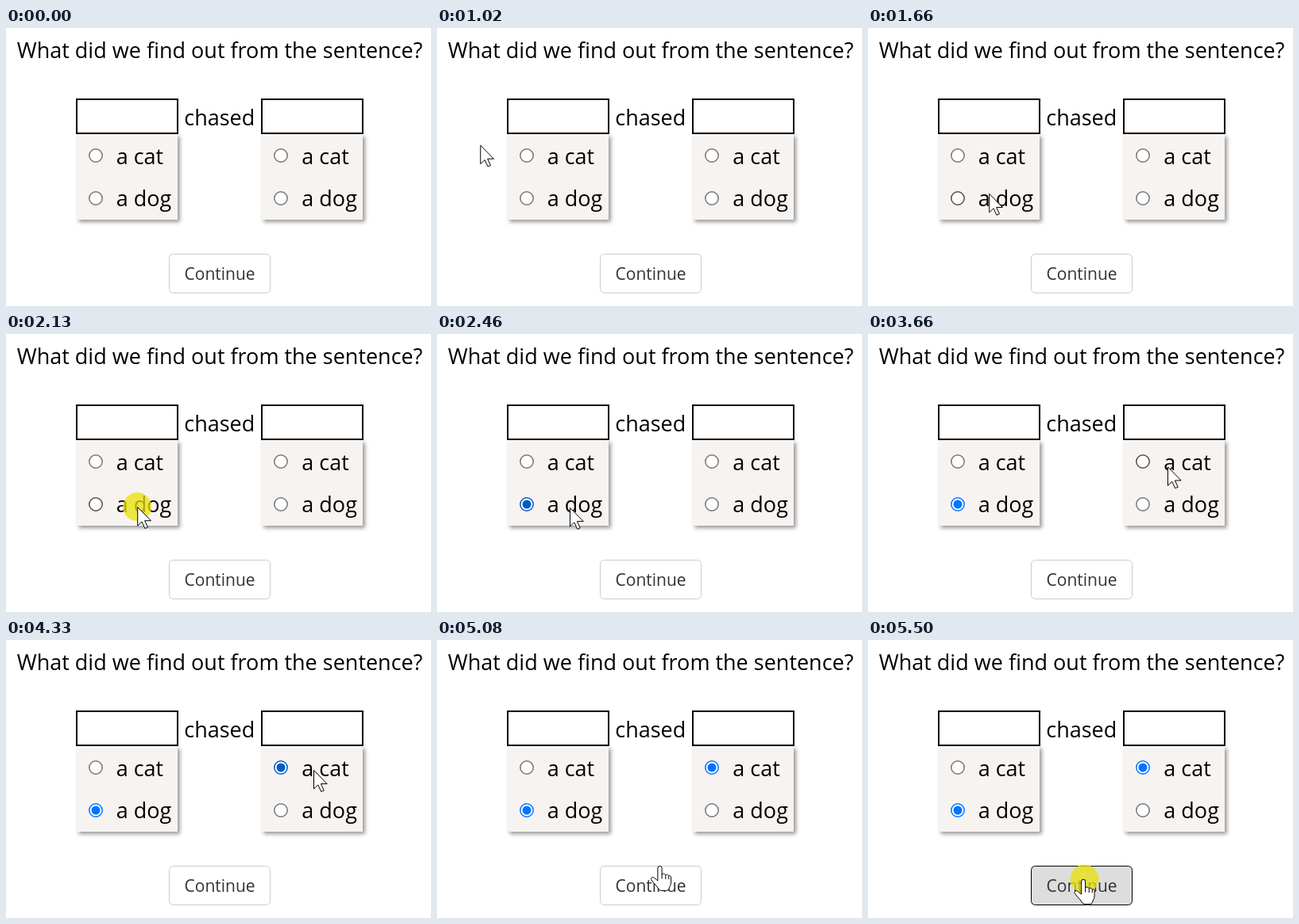
These frames come from a looping animation (535 px wide and 351 px high, 5570 ms). An HTML page:

```html
<!DOCTYPE html>
<html lang="en">
<head>
<meta charset="utf-8">
<style>
  html, body { margin: 0; width: 100%; height: 100%; overflow: hidden; background: #fff; }
  svg { display: block; font: 27px "Open Sans", sans-serif; }
  .panel { fill: #f7f3f1; filter: drop-shadow(3px 3px 2.5px #0006); }
  .box { fill: #fff; stroke: #000; stroke-width: 2; }
  .cursor { fill: #fff; stroke: #000; stroke-linejoin: round; }
</style>
</head>
<body>
<svg width="535" height="351" viewBox="0 0 535 351">
  <text x="13.7" y="38">What did we find out from the sentence?</text>
  <text x="224.3" y="123">chased</text>
  <g id="lists"></g>
  <rect id="button" x="205.5" y="285.5" width="127" height="49" rx="5"/>
  <text x="224.5" y="318" font-size="21" fill="#333">Continue</text>
  <g id="pointer">
    <circle id="glow" r="18" fill="#ebe10a" fill-opacity=".75"/>
    <path id="arrow" class="cursor" d="M.5.5V24L5.8 18.9 9.7 27.4 13.2 25.9 9.4 17.6H17.2Z"/>
    <path id="hand" class="cursor" transform="translate(-1.5 .5)" d="M-2.6 19V3a2.6 2.6 0 0 1 5.2 0V11.5c.5-2 4.2-2 4.7.7c.7-1.7 3.6-1.3 4 1c.9-1.2 2.8-.4 2.8 1.6V21c0 4-2 5-2.6 8Q11 31.5 8 31.5H2Q-.5 31.5-1.8 29C-4 25-9.5 20.5-10.8 17.5c-1-2.4 2-3.8 4-2.1ZM2.6 11.5v5M7.3 12.2v4.8M11.3 13.2v4"/>
  </g>
</svg>
<script>
const LOOP = 5570;
const $ = id => document.getElementById(id);
const easeOut = power => p => 1 - (1 - p) ** power;
const easeInOut = p => p * p * (3 - 2 * p);

// Pointer moves: start ms, end ms, steps, destination, easing
const origin = [7.5, 120];
const moves = [
  [880, 1370, 8, [132, 193.5], easeOut(1.4)],
  [1440, 1990, 9, [163, 217], easeOut(1.8)],
  [2060, 2460, 6, [167, 219], easeOut(2)],
  [2790, 3330, 9, [363, 173], easeInOut],
  [3410, 3930, 9, [384, 164.5], easeOut(1.35)],
  [4000, 4330, 4, [387, 164], easeOut(2)],
  [4590, 5080, 8, [282, 284.5], easeInOut],
  [5150, 5500, 6, [272.5, 301.5], easeOut(1.5)],
];
const clicks = [[2130, 2390], [4070, 4260], [5360, LOOP]];

// Options: left list cat/dog, then right list cat/dog
const options = [];
for (const x of [0, 233]) {
  let markup = '<rect class="panel" x="88.5" y="134" width="127.5" height="108"/>' +
    '<rect class="box" x="89" y="90" width="127" height="43"/>';
  ['a cat', 'a dog'].forEach((label, row) => {
    const y = 161 + row * 54;
    markup += `<circle class="ring" cx="113" cy="${y}" r="8.2" fill="#fff" stroke-width="1.5"/>
      <circle class="dot" cx="113" cy="${y}" r="5.5"/>
      <text x="${x ? 139.3 : 138.7}" y="${172 + row * 53}">${label}</text>`;
    options.push({ x, y, checkedAt: Infinity });
  });
  $('lists').innerHTML += `<g transform="translate(${x})">${markup}</g>`;
}
options[1].checkedAt = clicks[0][1];
options[2].checkedAt = clicks[1][1];
const rings = document.querySelectorAll('.ring');
const dots = document.querySelectorAll('.dot');

function pointerAt(t) {
  let from = origin;
  for (const [i, [start, end, steps, to, ease]] of moves.entries()) {
    if (t < start) break;
    const step = Math.min(steps - 1, Math.floor((t - start) / (end - start) * (steps - 1) + 0.25));
    const p = ease(i ? (step + 1) / steps : step / (steps - 1));
    const at = from.map((v, axis) => v + (to[axis] - v) * p);
    if (t < end) return at;
    from = to;
  }
  return from;
}

function draw() {
  const t = performance.now() % LOOP;
  const visible = t >= moves[0][0];
  const [x, y] = pointerAt(t);
  const show = (id, on) => $(id).setAttribute('visibility', on ? 'visible' : 'hidden');
  const onButton = y > 283;

  $('pointer').setAttribute('transform', `translate(${x} ${y})`);
  show('arrow', visible && !onButton);
  show('hand', visible && onButton);
  show('glow', clicks.some(([down, up]) => t >= down && t < up));

  options.forEach((option, i) => {
    const hover = visible && x > option.x + 104 && x < option.x + 209 && Math.abs(y - option.y) < 21;
    const checked = t >= option.checkedAt;
    const color = checked ? (hover ? '#005cc8' : '#0075ff') : (hover ? '#4f4f4f' : '#767676');
    rings[i].setAttribute('stroke', color);
    dots[i].setAttribute('fill', checked ? color : 'none');
  });

  const pressed = t >= clicks[2][0];
  $('button').setAttribute('fill', pressed ? '#ddd' : '#fff');
  $('button').setAttribute('stroke', pressed ? '#000' : '#ccc');
  requestAnimationFrame(draw);
}
draw();
</script>
</body>
</html>
```
